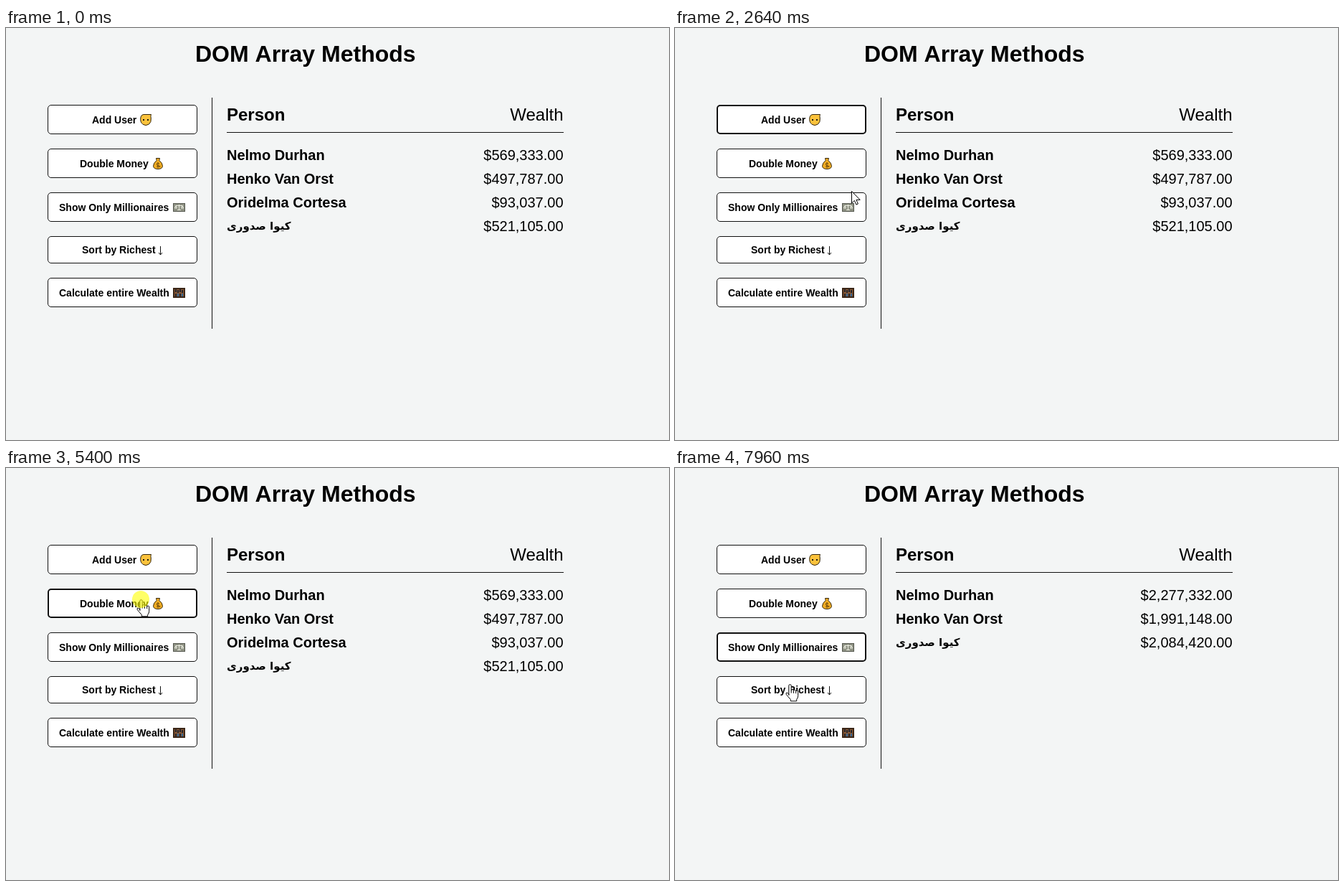
Animation, 925 px wide and 574 px high, one loop 8000 ms. Source, as an HTML page with a canvas:

```html
<!DOCTYPE html>
<html lang="en">
<head>
<meta charset="utf-8">
<title>DOM Array Methods</title>
<style>
html, body { margin: 0; width: 100%; height: 100%; overflow: hidden; background: #f3f5f5; }
canvas { display: block; }
</style>
</head>
<body>
<canvas id="stage" width="925" height="574"></canvas>
<script>
const ctx = document.getElementById('stage').getContext('2d');
const LOOP = 8000;
const TICK = 68;
const INK = '#111';
const MENU = { left: 58, top: 107, width: 209, gap: 20 };
const LIST = { left: 308, right: 777.5, firstLine: 184, lineHeight: 33 };
const ICON_WIDTH = 19;

const buttons = [
  { label: 'Add User', icon: face },
  { label: 'Double Money', icon: moneyBag },
  { label: 'Show Only Millionaires', icon: banknote },
  { label: 'Sort by Richest', icon: downArrow, h: 38, iconWidth: 7 },
  { label: 'Calculate entire Wealth', icon: abacus }
];

const people = [
  { name: 'Nelmo Durhan', wealth: 569333 },
  { name: 'Henko Van Orst', wealth: 497787 },
  { name: 'Oridelma Cortesa', wealth: 93037 },
  { name: 'کیوا صدوری', wealth: 521105, persian: true }
];

const clicks = [
  { down: 810, up: 940, button: 0 },
  { down: 5400, up: 5520, button: 1 },
  { down: 6270, up: 6340, button: 1 },
  { down: 7090, up: 7210, button: 2 }
];
const [, firstDouble, secondDouble, filterRich] = clicks.map(c => c.up);

// Each move bends from where the pointer rests towards its next stop.
const moves = [
  { start: 100, end: 760, bend: [300, 230], to: [207, 124] },
  { start: 1180, end: 1950, bend: [207, 150], to: [287, 230] },
  { start: 2000, end: 2760, bend: [296, 257], to: [225, 215] },
  { start: 2830, end: 3570, bend: [175, 215], to: [200, 187] },
  { start: 3640, end: 4220, bend: [229, 155], to: [188, 183] },
  { start: 5710, end: 5710, bend: [188, 183], to: [187, 183] },
  { start: 6410, end: 6900, bend: [182, 215], to: [161, 248] },
  { start: 7530, end: 7960, bend: [158, 272], to: [160, 301] }
];
moves.forEach((m, i) => { m.from = i ? moves[i - 1].to : [466, 442]; });

const arrowShape = new Path2D('M0 0V16.5L3.9 12.9 6.4 18.6 8.9 17.5 6.4 11.9H11.7Z');
const handShape = new Path2D('M-1.7 15V1.8a1.7 1.7 0 0 1 3.4 0V8.5a1.6 1.6 0 0 1 3.3 .5' +
  'a1.6 1.6 0 0 1 3.2 .7a1.5 1.5 0 0 1 3 .9V16q0 2.5-2 5V23.3H.8V21Q-3 17-5.3 13.8' +
  'q-.8-2 .8-2.4q1.2 0 2.8 2.5Z');
const knuckles = new Path2D('M1.7 8.5V12M5 9V12.3M8.2 9.7V12.6');

function rect(x, y, w, h, color) {
  ctx.fillStyle = color;
  ctx.fillRect(x, y, w, h);
}

function shape(path, fill, stroke = INK) {
  const p = typeof path === 'string' ? new Path2D(path) : path;
  if (fill) {
    ctx.fillStyle = fill;
    ctx.fill(p);
  }
  ctx.strokeStyle = stroke;
  ctx.lineWidth = 1;
  ctx.stroke(p);
}

function setFont(size, bold, family = '"Liberation Sans", Arial') {
  ctx.font = `${bold ? 'bold ' : ''}${size}px ${family}, sans-serif`;
}

function text(str, x, y, align = 'left') {
  ctx.textAlign = align;
  ctx.fillStyle = '#000';
  ctx.fillText(str, x, y);
}

function at(x, y, paint) {
  ctx.save();
  ctx.translate(x, y);
  paint();
  ctx.restore();
}

// Icons are drawn around their own centre.
function face() {
  shape('M-7-4Q-6-7.5-3-7.5H7.5Q6.5-6 7.3-2Q8 3 4.5 6Q0 9-4 6.3Q-8.5 3-7-4Z', '#fbc23c', '#33270f');
  rect(-4, -1, 2, 2, '#1c1810');
  rect(2, -1, 2, 2, '#1c1810');
}

function moneyBag() {
  shape('M-2.5-7.5H2.5L1.8-4.5Q6.5-1 6.5 3.5Q6 7.5 0 7.5Q-6 7.5-6.5 3.5Q-6.5-1-1.8-4.5Z', '#f0ad25', '#33270f');
  shape('M2 0Q-2-1.5-2 .4T2 3.4T-2 4M0-2V6', null, '#704a0c');
}

function banknote() {
  rect(-8, -6, 17, 12, '#55584f');
  rect(-7, -5, 15, 10, '#8f9284');
  shape('M.5-4V4M-4-2.5H5M-2 3.5H3M-4-2.5L-5.5 1H-2.5ZM5-2.5L3.5 1H6.5Z', null, '#eceee2');
}

function downArrow() {
  shape('M.5-5V7M-2 4L.5 7 3 4');
}

function abacus() {
  rect(-8, -7, 17, 14, '#3a2617');
  rect(-6, -5, 13, 10, '#8c5a35');
  for (let i = 0; i < 4; i++) {
    const x = i * 3 - 5;
    rect(x, -5 + i % 2, 2, 4, '#20242c');
    rect(x, 1, 2, 4, i % 2 ? '#2d6596' : '#20242c');
  }
}

function layOutButtons() {
  setFont(14, true);
  let y = MENU.top;
  for (const b of buttons) {
    b.y = y;
    b.h = b.h || 41;
    b.middle = Math.round(y + b.h / 2);
    const iconWidth = b.iconWidth || ICON_WIDTH;
    const labelWidth = ctx.measureText(b.label + ' ').width;
    const x = MENU.left + (MENU.width - labelWidth - iconWidth) / 2;
    b.textX = Math.round(x);
    b.iconX = Math.floor(x + labelWidth + iconWidth / 2);
    y += b.h + MENU.gap;
  }
}

function drawButton(b, focused) {
  const line = focused ? 2 : 1;
  ctx.beginPath();
  ctx.roundRect(MENU.left + line / 2, b.y + line / 2, MENU.width - line, b.h - line, 5 - line / 2);
  ctx.fillStyle = '#fff';
  ctx.fill();
  ctx.strokeStyle = INK;
  ctx.lineWidth = line;
  ctx.stroke();
  setFont(14, true);
  text(b.label, b.textX, b.middle + 5);
  at(b.iconX, b.middle, b.icon);
}

function drawPeople(t) {
  const factor = 2 ** ((t >= firstDouble) + (t >= secondDouble));
  people
    .map(p => ({ ...p, wealth: p.wealth * factor }))
    .filter(p => t < filterRich || p.wealth > 1e6)
    .forEach((p, i) => {
      const y = LIST.firstLine + i * LIST.lineHeight;
      if (p.persian) setFont(15, true, '"DejaVu Sans"');
      else setFont(20, true);
      text(p.name, LIST.left, p.persian ? y - 2 : y);
      setFont(20, false);
      text('$' + p.wealth.toLocaleString('en-US', { minimumFractionDigits: 2 }), LIST.right, y, 'right');
    });
}

function pointerAt(t) {
  const move = moves.filter(m => m.start <= t).pop();
  if (!move) return null;
  const { start, end, from, bend, to } = move;
  const steps = Math.round((end - start) / TICK) + 1;
  const progress = end > start ? Math.min(1, (t - start) / (end - start)) : 1;
  const u = (Math.floor(progress * (steps - 1)) + 1) / steps;
  return from.map((a, i) => Math.round((1 - u) ** 2 * a + 2 * u * (1 - u) * bend[i] + u * u * to[i]));
}

function drawPointer(x, y) {
  const overMenu = x >= MENU.left && x < MENU.left + MENU.width;
  const hand = overMenu && buttons.some(b => y >= b.y && y < b.y + b.h);
  at(x + 0.5, y + 0.5, () => {
    shape(hand ? handShape : arrowShape, '#fff', '#000');
    if (hand) shape(knuckles, null, '#000');
  });
}

function drawHighlight(x, y) {
  ctx.beginPath();
  ctx.arc(x, y, 12, 0, Math.PI * 2);
  ctx.fillStyle = 'rgba(255, 255, 0, 0.6)';
  ctx.fill();
}

function draw(t) {
  rect(0, 0, 925, 574, '#f3f5f5');
  rect(287, 97, 1, 322, INK);
  rect(LIST.left, 145, 470, 1, INK);
  setFont(32, true);
  text('DOM Array Methods', 264, 47);
  setFont(24, true);
  text('Person', LIST.left, 129);
  setFont(24, false);
  text('Wealth', LIST.right, 129, 'right');

  const click = clicks.filter(c => c.down <= t).pop();
  buttons.forEach((b, i) => drawButton(b, click && click.button === i));
  drawPeople(t);

  const pointer = pointerAt(t);
  if (pointer) drawPointer(...pointer);
  if (click && t < click.up) drawHighlight(...pointer);
}

layOutButtons();
const began = performance.now();
function tick() {
  draw((performance.now() - began) % LOOP);
  requestAnimationFrame(tick);
}
tick();
</script>
</body>
</html>
```
